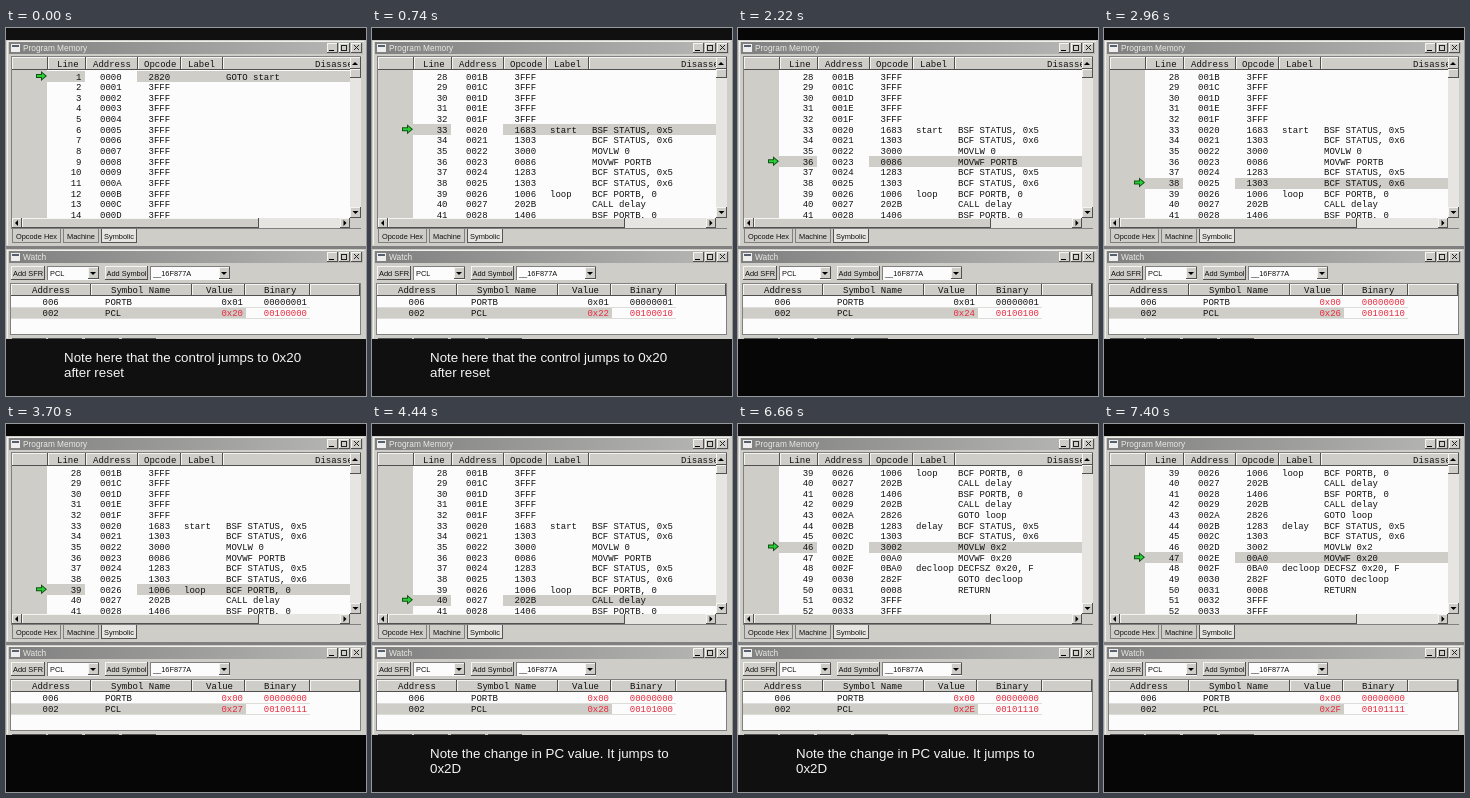
Recreate the animation shown at these times as an HTML page with a canvas. Size 360x368 px, loop 8000 ms.

```html
<!DOCTYPE html>
<html lang="en">
<head>
<meta charset="utf-8">
<title>Program counter walkthrough</title>
<style>
  html, body { margin: 0; width: 100%; height: 100%; overflow: hidden; background: #000; }
  canvas { display: block; width: 360px; height: 368px; }
</style>
</head>
<body>
<canvas id="stage" width="360" height="368"></canvas>
<script>
const ctx = document.getElementById('stage').getContext('2d');
const MONO = '9px "Liberation Mono", monospace';
const UI = '7.4px "Liberation Sans", sans-serif';
const TITLE = '8.3px "Liberation Sans", sans-serif';
const CAPTION = '13.33px "Liberation Sans", sans-serif';
const FACE = '#cfcdc8', PAPER = '#fcfcfc', INK = '#101010', SHADE = '#808080', RED = '#e8283c';
const STEP_MS = 740, LOOP_MS = 8000, ROW_H = 10.65;

// Opcode, label and disassembly, starting at address 0x20.
const program = `1683|start|BSF STATUS, 0x5
1303||BCF STATUS, 0x6
3000||MOVLW 0
0086||MOVWF PORTB
1283||BCF STATUS, 0x5
1303||BCF STATUS, 0x6
1006|loop|BCF PORTB, 0
202B||CALL delay
1406||BSF PORTB, 0
202B||CALL delay
2826||GOTO loop
1283|delay|BCF STATUS, 0x5
1303||BCF STATUS, 0x6
3002||MOVLW 0x2
00A0||MOVWF 0x20
0BA0|decloop|DECFSZ 0x20, F
282F||GOTO decloop
0008||RETURN`.split('\n').map(line => line.split('|'));

const resetNote = ['Note here that the control jumps to 0x20', 'after reset'];
const jumpNote = ['Note the change in PC value. It jumps to', '0x2D'];

// First visible line, current address, PCL, PORTB, caption.
const steps = [
  [1, 0x00, 0x20, 1, resetNote],
  [28, 0x20, 0x22, 1, resetNote],
  [28, 0x22, 0x23, 1],
  [28, 0x23, 0x24, 1],
  [28, 0x25, 0x26, 0],
  [28, 0x26, 0x27, 0],
  [28, 0x27, 0x28, 0, jumpNote],
  [39, 0x2B, 0x2D, 0, jumpNote],
  [39, 0x2C, 0x2D, 0, jumpNote],
  [39, 0x2D, 0x2E, 0, jumpNote],
  [39, 0x2E, 0x2F, 0],
];

const hex = (n, width) => n.toString(16).toUpperCase().padStart(width, '0');

function rect(x, y, w, h, color) {
  ctx.fillStyle = color;
  ctx.fillRect(x, y, w, h);
}

function text(str, x, y, font = MONO, color = INK, align = 'left') {
  ctx.font = font;
  ctx.fillStyle = color;
  ctx.textAlign = align;
  ctx.fillText(str, x, y);
}

function bevel(x, y, w, h, fill = FACE) {
  rect(x, y, w, h, '#505050');
  rect(x, y, w - 1, h - 1, '#f4f4f0');
  rect(x + 1, y + 1, w - 2, h - 2, fill);
}

function polygon(points, color) {
  ctx.beginPath();
  points.forEach(([x, y]) => ctx.lineTo(x, y));
  ctx.closePath();
  ctx.fillStyle = color;
  ctx.fill();
}

function triangle(x, y, dx, dy) {
  const tip = [x + dx * 2, y + dy * 2];
  const base = side => [x - dx + dy * 3 * side, y - dy + dx * 3 * side];
  polygon([tip, base(1), base(-1)], '#000');
}

function windowFrame(title, y, h) {
  rect(0, y, 360, h, FACE);
  rect(1, y + 1, 357, 1, '#f0f0ec');
  rect(1, y + 1, 1, h - 2, '#f0f0ec');
  const bar = ctx.createLinearGradient(3, 0, 357, 0);
  bar.addColorStop(0, '#808080');
  bar.addColorStop(1, '#b8b8b6');
  rect(3, y + 2, 354, 12, bar);
  rect(5, y + 4, 9, 8, '#eee');
  rect(6, y + 5, 7, 2, '#55606c');
  text(title, 17, y + 11, TITLE, '#e8e8e4');
  for (const x of [321, 333, 345]) bevel(x, y + 3, 11, 10);
  rect(323, y + 10, 5, 1, '#000');
  ctx.strokeStyle = '#222';
  ctx.lineWidth = 1;
  ctx.strokeRect(335.5, y + 5.5, 5, 5);
  ctx.beginPath();
  ctx.moveTo(348, y + 5); ctx.lineTo(353, y + 10);
  ctx.moveTo(353, y + 5); ctx.lineTo(348, y + 10);
  ctx.stroke();
}

function headerRow(edges, y, h) {
  for (let i = 0; i < edges.length - 1; i++)
    bevel(edges[i], y, edges[i + 1] - edges[i], h);
}

function drawListing(top, current) {
  rect(5, 28, 350, 173, SHADE);
  rect(6, 29, 338, 161, PAPER);
  rect(6, 42, 35, 148, FACE);
  headerRow([6, 42, 80, 132, 175, 217, 345], 29, 13);

  ctx.save();
  ctx.beginPath();
  ctx.rect(6, 29, 338, 161);
  ctx.clip();
  [['Line', 51], ['Address', 87], ['Opcode', 138], ['Label', 182], ['Disassembly', 309]]
    .forEach(([label, x]) => text(label, x, 39));
  for (let row = 0; row < 14; row++) {
    const address = top + row - 1;
    const y = 51.5 + row * ROW_H;
    const [opcode, label, code] = address === 0 ? ['2820', '', 'GOTO start']
      : program[address - 0x20] || ['3FFF', '', ''];
    if (address === current) {
      rect(41, Math.round(y - 8.5), 303, 11, FACE);
      rect(79, Math.round(y - 8.5), 52, 11, PAPER);
      const m = y - 3.5;
      polygon([[30, m - 2], [35, m - 2], [35, m - 5], [41, m], [35, m + 5], [35, m + 2], [30, m + 2]], '#145014');
      polygon([[31, m - 1], [36, m - 1], [36, m - 3], [39.5, m], [36, m + 3], [36, m + 1], [31, m + 1]], '#28d038');
    }
    text(address + 1, 75.5, y, MONO, INK, 'right');
    text(hex(address, 4), 94, y);
    text(opcode, 142.5, y);
    text(label, 178, y);
    text(code, 220, y);
  }
  ctx.restore();

  rect(344, 29, 11, 161, '#e6e5e1');
  bevel(344, 29, 11, 12);
  triangle(349, 36, 0, -1);
  bevel(344, 41, 11, 9);
  bevel(344, 179, 11, 11);
  triangle(349.5, 184, 0, 1);
  rect(6, 190, 349, 10, '#e6e5e1');
  bevel(6, 190, 10, 10);
  triangle(11, 195, -1, 0);
  bevel(16, 190, 237, 10);
  bevel(334, 190, 10, 10);
  triangle(338.5, 195, 1, 0);
  rect(344, 190, 11, 10, FACE);
}

function drawTabs() {
  rect(5, 201, 350, 14, FACE);
  [['Opcode Hex', 6, 49], ['Machine', 57, 36], ['Symbolic', 95, 36]].forEach(([label, x, w], i) => {
    const active = i === 2;
    rect(x, 201, w, 14, active ? '#555' : SHADE);
    rect(x + 1, 201, w - 2, 13, active ? '#e6e5e1' : FACE);
    text(label, x + w / 2, 211, UI, INK, 'center');
  });
}

function combo(x, w, label) {
  rect(x, 238, w, 14, SHADE);
  rect(x + 1, 239, w - 1, 13, PAPER);
  text(label, x + 3, 248, UI);
  bevel(x + w - 11, 239, 11, 12);
  triangle(x + w - 6, 245, 0, 1);
}

function drawWatch(pcl, portb) {
  bevel(5, 238, 34, 14);
  text('Add SFR', 22, 248, UI, INK, 'center');
  combo(41, 52, 'PCL');
  bevel(99, 238, 43, 14);
  text('Add Symbol', 120.5, 248, UI, INK, 'center');
  combo(144, 80, '__16F877A');

  rect(4, 255, 351, 52, SHADE);
  rect(5, 256, 349, 50, PAPER);
  headerRow([5, 85, 186, 239, 304, 354], 256, 12);
  [['Address', 26], ['Symbol Name', 105], ['Value', 200], ['Binary', 258]]
    .forEach(([label, x]) => text(label, x, 265));
  rect(5, 279, 235, 11, FACE);
  rect(5, 279, 299, 1, '#dcdcd8');
  rect(5, 290, 299, 1, '#dcdcd8');
  const register = (address, name, value, y, color) => {
    text(address, 36.5, y);
    text(name, 99, y);
    text('0x' + hex(value, 2), 237, y, MONO, color, 'right');
    text(value.toString(2).padStart(8, '0'), 301, y, MONO, color, 'right');
  };
  register('006', 'PORTB', portb, 276.5, portb ? INK : RED);
  register('002', 'PCL', pcl, 287.5, RED);
  for (const x of [6, 42, 79, 116]) rect(x, 310, 34, 1, '#555');
}

function draw([top, current, pcl, portb, caption = []]) {
  rect(0, 0, 360, 368, caption.length ? '#101010' : '#060606');
  rect(0, 12, 360, 299, SHADE);
  windowFrame('Program Memory', 12, 206);
  drawListing(top, current);
  drawTabs();
  windowFrame('Watch', 221, 90);
  drawWatch(pcl, portb);
  caption.forEach((line, i) => text(line, 58, 334 + i * 14.5, CAPTION, '#f4f4f4'));
}

const start = performance.now();
function tick() {
  const elapsed = (performance.now() - start) % LOOP_MS;
  draw(steps[Math.floor(elapsed / STEP_MS)]);
  requestAnimationFrame(tick);
}
tick();
</script>
</body>
</html>
```
